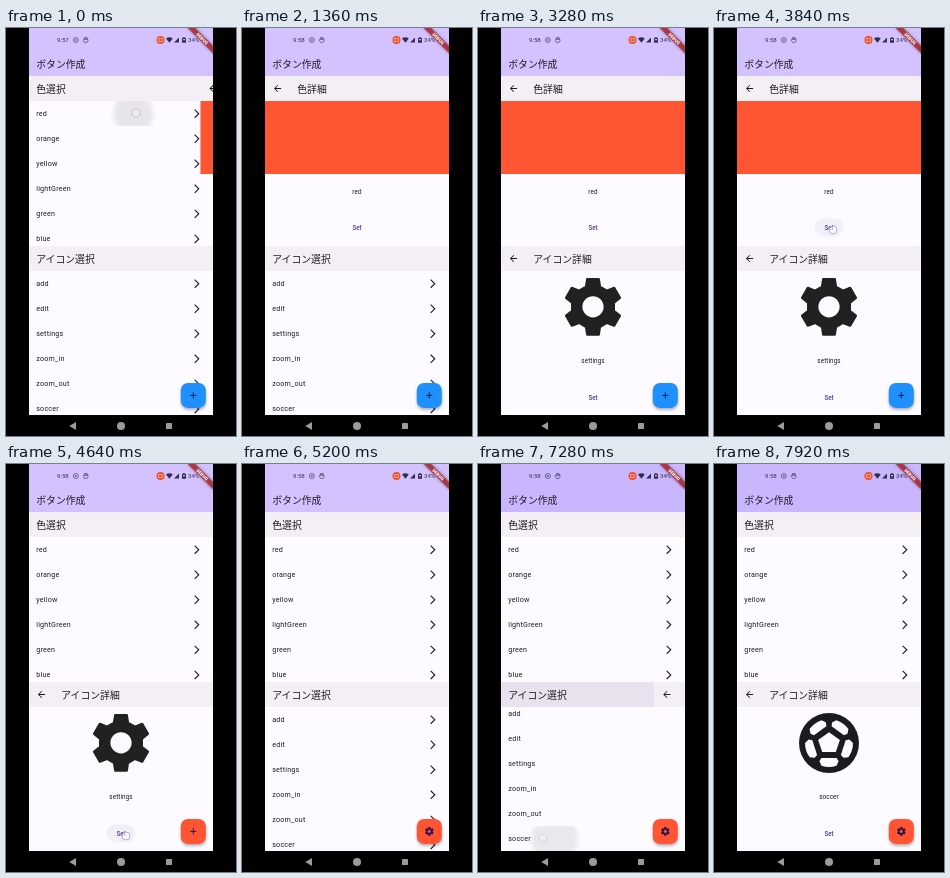
An HTML page for the animation above (8000 ms loop, 230 by 408 pixels).

```html
<!DOCTYPE html>
<html lang="ja">
<head>
<meta charset="utf-8">
<style>
  html, body { margin: 0; width: 100%; height: 100%; overflow: hidden; background: #000; }
  body > svg { display: block; width: 100vw; height: 100vh; }
  text { font-family: Roboto, "Noto Sans CJK JP", "Noto Sans CJK", sans-serif; fill: #1c1b1f; white-space: pre; }
  .title { font-size: 9.86px; font-family: "Noto Sans CJK JP", "Noto Sans CJK", sans-serif; }
  .item { font-size: 7.16px; letter-spacing: .22px; }
  .name { font-size: 6.27px; letter-spacing: .11px; text-anchor: middle; }
  .set { font-size: 6.27px; font-weight: 500; text-anchor: middle; fill: #4a419f; }
  .status { font-size: 6.1px; fill: #33304a; }
  .debug { font-size: 4.56px; font-weight: 900; text-anchor: middle; fill: #fff; }
</style>
</head>
<body>
<svg id="stage" viewBox="0 0 230 408"></svg>
<script>
const LOOP = 8000, WIDTH = 184, SLIDE = 300, ROW = 25.05;
const RED = '#ff5533', BLUE = '#1e90ff', INK = '#1c1b1f', PAPER = '#fdfbff', HEADER = '#f4eff4';
const COLORS = ['red', 'orange', 'yellow', 'lightGreen', 'green', 'blue'];
const ICONS = ['add', 'edit', 'settings', 'zoom_in', 'zoom_out', 'soccer'];

// Touches in stage coordinates; a page change starts when the finger lifts.
const openColor = { x: 130, y: 85, down: -150, up: -54 };
const openGear = { x: 110, y: 305, down: 2050, up: 2150 };
const setColor = { x: 119, y: 202, down: 3790, up: 3900 };
const setIcon = { x: 120, y: 372, down: 4580, up: 4740 };
const drag = { x: 88, y: 347, down: 6330, up: 6680, dy: -45 };
const openSoccer = { x: 65, y: 374, down: 7090, up: 7196 };
const touches = [openColor, openGear, setColor, setIcon, drag, openSoccer];

const clamp = v => Math.min(1, Math.max(0, v));
const mix = (a, b, p) => a + (b - a) * p;
const mixRgb = (a, b, p) => `rgb(${a.map((v, i) => Math.round(mix(v, b[i], p)))})`;

// cubic-bezier(.42, 0, .58, 1)
function easeInOut(x) {
  if (x <= 0 || x >= 1) return clamp(x);
  let lo = 0, hi = 1, u;
  for (let i = 0; i < 20; i++) {
    u = (lo + hi) / 2;
    const at = 3 * (1 - u) ** 2 * u * .42 + 3 * (1 - u) * u * u * .58 + u ** 3;
    if (at < x) lo = u; else hi = u;
  }
  return u * u * (3 - 2 * u);
}

function gearPath() {
  const tooth = [[-2.35, -6.8], [-1.95, -9.4], [1.95, -9.4], [2.35, -6.8]];
  const points = [];
  for (let k = 0; k < 6; k++) {
    const c = Math.cos(k * Math.PI / 3), s = Math.sin(k * Math.PI / 3);
    for (const [x, y] of tooth) points.push(`${(x * c - y * s).toFixed(2)} ${(x * s + y * c).toFixed(2)}`);
  }
  return `M${points.join('L')}ZM4 0A4 4 0 1 0 -4 0A4 4 0 1 0 4 0Z`;
}

const gear = color => `<path d="${gearPath()}" fill="${color}" stroke="${color}" stroke-width=".8"
  stroke-linejoin="round" fill-rule="evenodd"/>`;

function soccer() {
  let patches = '';
  for (let k = 0; k < 5; k++)
    patches += `<path transform="rotate(${72 * k})"
      d="M2.5 7.59A8 8 0 0 1 -2.5 7.59L-3.19 6.1L-2.55 5H2.55L3.19 6.1Z"/>`;
  return `<circle r="10" fill="${INK}"/><g fill="${PAPER}">
    <path d="M2.27 3H-2.27L-3.62 -1.02L0 -3.56L3.63 -1.02Z"/>${patches}</g>`;
}

const header = (id, label, x) => `<rect id="${id}" width="184" height="25" fill="${HEADER}"/>
  <text class="title" x="${x}" y="17.1">${label}</text>`;

const row = (label, i) => `<g transform="translate(0 ${25 + i * ROW})">
  <text class="item" x="7.2" y="15">${label}</text>
  <path transform="translate(162.5 7.3) scale(.447)" fill="${INK}"
    d="M6.23 20.23L8 22L18 12L8 2L6.23 3.77L14.46 12Z"/></g>`;

// A list page with a detail page that slides over it.
const navigator = (id, top, height, listTitle, detailTitle, items, detail) => `
  <svg x="23" y="${top}" width="184" height="${height}">
    <rect width="184" height="${height}" fill="${PAPER}"/>
    <g id="${id}Rows">
      <svg id="${id}Row" width="184" height="25"><circle id="${id}Ripple" cy="12.5" fill="${INK}" filter="url(#soft)"/></svg>
      ${items.map(row).join('')}
    </g>
    ${header(id + 'Header', listTitle, 7.2)}
    <g id="${id}Page">
      <rect width="184" height="${height}" fill="${PAPER}"/>
      ${header(id + 'Detail', detailTitle, 32.2)}
      <path transform="translate(7.15 7.15) scale(.447)" fill="${INK}"
        d="M20 11H7.83l5.59-5.59L12 4l-8 8 8 8 1.41-1.41L7.83 13H20z"/>
      ${detail}
      <rect id="${id}Press" x="77.7" y="142.5" width="28.6" height="17.9" rx="8.9" fill="#6750a4"/>
      <text class="set" x="92" y="153.8">Set</text>
    </g>
  </svg>`;

document.getElementById('stage').innerHTML = `
  <defs>
    <filter id="soft" x="-50%" y="-50%" width="200%" height="200%"><feGaussianBlur stdDeviation="2"/></filter>
    <filter id="shadow" x="-50%" y="-50%" width="200%" height="200%"><feGaussianBlur stdDeviation="1.6"/></filter>
    <clipPath id="screen"><rect x="23" width="184" height="387"/></clipPath>
  </defs>
  <rect width="230" height="408"/>
  <g clip-path="url(#screen)">
    <rect id="appBar" x="23" width="184" height="48"/>
    <text class="title" x="30.2" y="40.3">ボタン作成</text>
    <text id="clock" class="status" x="51" y="14.2"></text>
    <g fill="none" stroke="#4a4560" stroke-width=".7">
      <circle cx="69.8" cy="12" r="2.5"/><circle cx="69.8" cy="12" r=".7"/>
      <circle cx="79.8" cy="12.3" r="2.3"/><path d="M77.8 11.4H81.8M78.2 9.6L81.4 9.6"/>
    </g>
    <circle cx="154.5" cy="12" r="4" fill="#f0502d"/>
    <path d="M152.6 10.5H156.4V13.5H152.6Z" fill="none" stroke="#ffd9cc" stroke-width=".6"/>
    <g fill="#33304a">
      <path d="M160 10.6Q163.4 8 166.8 10.6L163.4 14.8Z"/>
      <path d="M168 14.6H173V9.4Z"/>
      <path d="M176.9 9.3H179.1V10H180V14.8H176V10H176.9Z"/>
    </g>
    <path d="M177 11H179V12.3H177Z" fill="#d4c1ff"/>
    <text class="status" x="182" y="14.2">34%</text>
    ${navigator('color', 48, 170, '色選択', '色詳細', COLORS, `
      <rect y="25" width="184" height="73" fill="${RED}"/>
      <text class="name" x="92" y="117.7">red</text>`)}
    ${navigator('icon', 218, 169, 'アイコン選択', 'アイコン詳細', ICONS, `
      <g id="gearDetail" transform="translate(92 60.8) scale(2.95)">${gear('#212121')}</g>
      <g id="soccerDetail" transform="translate(92 61) scale(3)">${soccer()}</g>
      <text id="iconName" class="name" x="92" y="117.2"></text>`)}
    <rect x="175" y="356.8" width="25" height="25" rx="7.2" opacity=".32" filter="url(#shadow)"/>
    <rect id="fab" x="174.8" y="354.9" width="25" height="25" rx="7.2"/>
    <path id="plus" d="M184.2 367.4H190.4M187.3 364.3V370.5" stroke="#21104d" stroke-width=".9"/>
    <g id="fabGear" transform="translate(187.3 367.4) scale(.447)">${gear('#21104d')}</g>
    <g transform="translate(207 0) rotate(45)">
      <rect x="-18" y="12.5" width="36" height="5.4" opacity=".4" filter="url(#shadow)"/>
      <rect x="-18" y="12.5" width="36" height="5.4" fill="#b71c1c" opacity=".7"/>
      <text class="debug" y="16.8">DEBUG</text>
    </g>
  </g>
  <g fill="#9b9b9b">
    <path d="M63.2 398L70 394V402Z"/><circle cx="115" cy="398" r="4"/>
    <rect x="160" y="395" width="6" height="6" rx=".4"/>
  </g>
  <circle id="touch" r="4" fill="#fff" fill-opacity=".55" stroke="#9a98b4" stroke-width=".7"/>`;

const el = id => document.getElementById(id);
const set = (id, attrs) => { for (const key in attrs) el(id).setAttribute(key, attrs[key]); };
const show = (id, on) => set(id, { display: on ? 'inline' : 'none' });

const slide = (t, event) => easeInOut((t - event.up) / SLIDE);
const fade = (t, touch, time) => t < touch.down ? 0 : 1 - clamp((t - touch.up) / time);

function drawRipple(id, t, touch, index) {
  const age = Math.max(0, t - touch.down);
  const spread = clamp(age / 500);
  set(id + 'Row', { y: 25 + index * ROW });
  set(id + 'Ripple', {
    cx: mix(touch.x - 23, 92, spread * .6),
    r: 8 + 40 * spread,
    opacity: .11 * fade(t, touch, 350)
  });
}

function draw(t) {
  const colorOpen = slide(t, openColor) - slide(t, setColor);
  const iconOpen = slide(t, openGear) - slide(t, setIcon) + slide(t, openSoccer);
  set('colorPage', { transform: `translate(${WIDTH * (1 - colorOpen)} 0)` });
  set('iconPage', { transform: `translate(${WIDTH * (1 - iconOpen)} 0)` });

  const second = t > 6000;
  show('gearDetail', !second);
  show('soccerDetail', second);
  el('iconName').textContent = second ? 'soccer' : 'settings';

  const scroll = easeInOut((t - 6420) / 160);
  const tint = clamp((t - 6440) / 200);
  set('iconRows', { transform: `translate(0 ${-6 * scroll})` });
  set('appBar', { fill: mixRgb([212, 193, 255], [201, 182, 255], tint) });
  set('iconHeader', { fill: mixRgb([244, 239, 244], [233, 225, 238], tint) });

  drawRipple('color', t, openColor, 0);
  drawRipple('icon', t, second ? openSoccer : openGear, second ? 5 : 2);
  set('colorPress', { opacity: .07 * fade(t, setColor, 250) });
  set('iconPress', { opacity: t < 6000 ? .07 * fade(t, setIcon, 250) : 0 });

  const gearSet = t >= setIcon.up;
  set('fab', { fill: t < setColor.up ? BLUE : RED });
  show('plus', !gearSet);
  show('fabGear', gearSet);
  el('clock').textContent = t < 1360 ? '9:57' : '9:58';

  const touch = touches.findLast(item => t >= item.down);
  const moved = clamp((t - 6400) / (drag.up - 6400)) * (touch.dy || 0);
  set('touch', { cx: touch.x, cy: touch.y + moved, opacity: fade(t, touch, 130) });
}

const start = performance.now();
function tick() {
  draw((performance.now() - start) % LOOP);
  requestAnimationFrame(tick);
}
tick();
</script>
</body>
</html>
```
